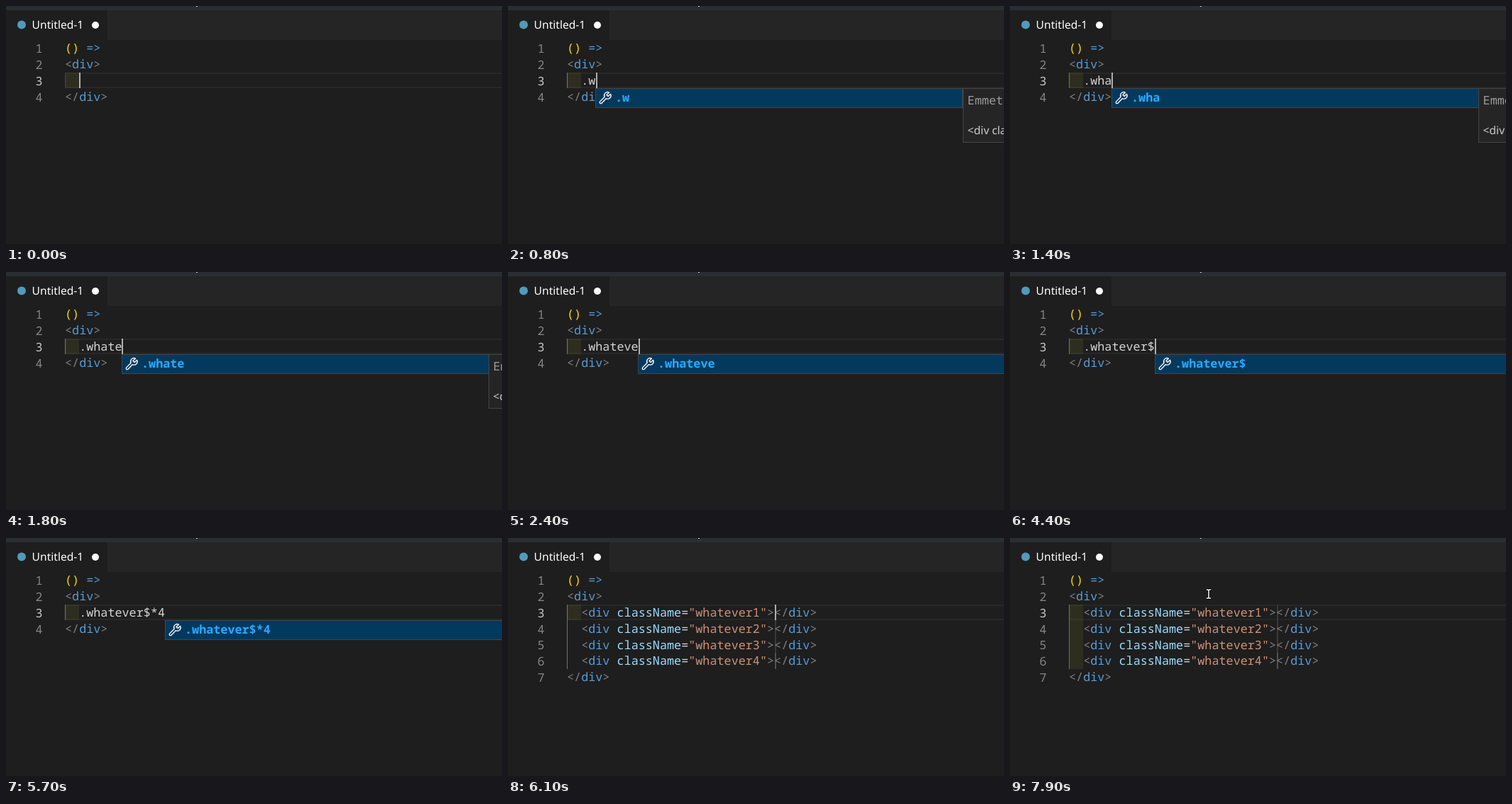
An HTML page for the animation above (8000 ms loop, 699 by 336 pixels).

```html
<!DOCTYPE html>
<html lang="en">
<head>
<meta charset="utf-8">
<title>Editor abbreviation</title>
<style>
  html, body { margin: 0; width: 100%; height: 100%; overflow: hidden; background: #1e1e1e; }
  svg { display: block; width: 699px; height: 336px; }
  text { white-space: pre; text-rendering: geometricPrecision; font: 16.8px "Noto Sans Mono", monospace; }
  text.ui { font: 15.6px "Noto Sans", sans-serif; }
  text.match { font-weight: 700; }
</style>
</head>
<body>
<svg id="stage" viewBox="0 0 699 336">
  <rect width="699" height="336" fill="#1e1e1e"/>
  <rect width="699" height="6" fill="#2a2e32"/>
  <rect x="268" width="2" height="1" fill="#d0d2d4"/>
  <rect x="143" y="6" width="556" height="42" fill="#252526"/>
  <circle cx="22" cy="26.5" r="6" fill="#519aba"/>
  <text class="ui" x="36.6" y="32" fill="#fff">Untitled-1</text>
  <circle cx="126" cy="27" r="5" fill="#fff"/>
  <g id="editor"></g>
</svg>
<script>
const LOOP = 8000, EXPAND = 6100, LEFT = 83, ZOOM = 1.2, LINE = 22.8;
const ABBREVIATION = '.whatever$*4';
// [time, typed characters]
const TYPING = [[0, 0], [300, 1], [800, 2], [1300, 3], [1400, 4], [1700, 5], [1800, 6],
  [2200, 7], [2400, 8], [2600, 9], [3400, 10], [4600, 11], [5200, 12], [EXPAND, 0]];
// [time, x, y]
const POINTER = [[7700, 251, 92], [7800, 266, 84], [7900, 280, 79]];
const BLUE = '#569cd6', GREY = '#808080', PLAIN = '#d4d4d4';

const escapeText = s => s.replace(/&/g, '&amp;').replace(/</g, '&lt;').replace(/>/g, '&gt;');
const span = (fill, s) => `<tspan fill="${fill}">${escapeText(s)}</tspan>`;
const rect = (x, y, w, h, fill, extra = '') =>
  `<rect x="${x}" y="${y}" width="${w}" height="${h}" fill="${fill}" ${extra}/>`;
const text = (x, y, fill, s, kind = '') =>
  `<text class="${kind}" x="${x}" y="${y}" fill="${fill}">${escapeText(s)}</text>`;
const frame = (x, y, w, h, fill) =>
  rect(x + .5, y + .5, w - 1, h - 1, fill, 'stroke="#454545"');
const latest = (steps, t) => steps.filter(step => step[0] <= t).pop();

const lineTop = n => Math.round(48 + (n - 1) * LINE);
const baseline = n => 48 + (n - 1) * LINE + 17.9;
const columnX = col => LEFT + Math.round(col * 8.4) * ZOOM;

const tag = (open, close) => span(GREY, open) + span(BLUE, 'div') + span(GREY, close);
const child = i => '  ' + span(GREY, '<') + span(BLUE, 'div') + span('#9cdcfe', ' className') +
  span(PLAIN, '=') + span('#ce9178', `"whatever${i}"`) + span(GREY, '>') + tag('</', '>');

function codeLine(markup, i) {
  const n = i + 1;
  return text(41.6, Math.round(baseline(n) + .3), n === 3 ? '#c6c6c6' : '#858585', String(n)) +
    `<text x="${LEFT}" y="${Math.floor(baseline(n))}">${markup}</text>`;
}

function popup(typed) {
  const anchor = columnX(typed.length + 2), x = Math.floor(anchor), side = Math.floor(anchor + 517.2);
  return frame(x, 116, 518, 28, '#04395e') +
    `<path transform="translate(${x + 4.5} 120) scale(1.2)" fill="none" stroke="#fff" stroke-width="1.1"
      stroke-linejoin="round" d="M12.4 1.8A3.8 3.8 0 0 0 7.2 6.9L1.8 12.4a1.2 1.2 0 0 0 1.9 1.9L9.1 8.8
      A3.8 3.8 0 0 0 14.2 3.6L11.4 6.3 9.5 4.5Z"/>` +
    text(x + 28, 135, '#2aaaff', typed, 'match') +
    frame(side, 116, 300, 77, '#252526') +
    text(side + 6.6, 139, '#9a9a9a', 'Emmet Abbreviation') +
    text(side + 6.6, 181, '#cccccc', `<div className="${typed.slice(1)}">|</div>`, 'ui');
}

function pointer([, x, y]) {
  const beam = 'M-3 -6H-1L0 -5L1 -6H3M0 -5V5M-3 6H-1L0 5L1 6H3';
  return `<g transform="translate(${x} ${y})" fill="none">
    <path d="${beam}" stroke="#000" stroke-width="3.4"/>
    <path d="${beam}" stroke="#fff" stroke-width="1.5"/></g>`;
}

function draw(t) {
  const [since, count] = latest(TYPING, t);
  const expanded = t >= EXPAND;
  const typed = ABBREVIATION.slice(0, count);
  const body = expanded ? [1, 2, 3, 4].map(child) : ['  ' + span(PLAIN, typed)];
  const lines = [span('#ffd700', '()') + span(BLUE, ' =>'), tag('<', '>'), ...body, tag('</', '>')];
  const lastBody = lines.length - 1;
  const tinted = t >= EXPAND + 100 ? lastBody : 3;

  let out = rect(LEFT + 1, 95, 640, 20, 'none', 'stroke="#282828" stroke-width="2"');
  out += rect(LEFT, 94, 20, lineTop(tinted + 1) - 94, '#ffff40', 'fill-opacity=".07"');
  out += rect(LEFT, 94, 1, lineTop(lastBody + 1) - 94, t < 300 ? '#404040' : '#707070');
  if (expanded) {
    for (let n = 3; n <= lastBody; n++) {
      out += rect(376, lineTop(n), 2, lineTop(n + 1) - lineTop(n), n === lastBody ? '#525252' : '#3a3a3a');
    }
  }
  out += lines.map(codeLine).join('');
  if (Math.floor((t - since) / 500) % 2 === 0) {
    out += rect(Math.round(columnX(expanded ? 29 : count + 2)), 94, 2, 22, '#aeafad');
  }
  if (count && t >= 400) out += popup(typed);
  const mouse = latest(POINTER, t);
  return mouse ? out + pointer(mouse) : out;
}

const editor = document.getElementById('editor');
const start = performance.now();
let shown = -1;
function tick() {
  // every change falls on a tenth of a second
  const t = Math.floor((performance.now() - start) % LOOP / 100) * 100;
  if (t !== shown) editor.innerHTML = draw(shown = t);
  requestAnimationFrame(tick);
}
tick();
</script>
</body>
</html>
```
